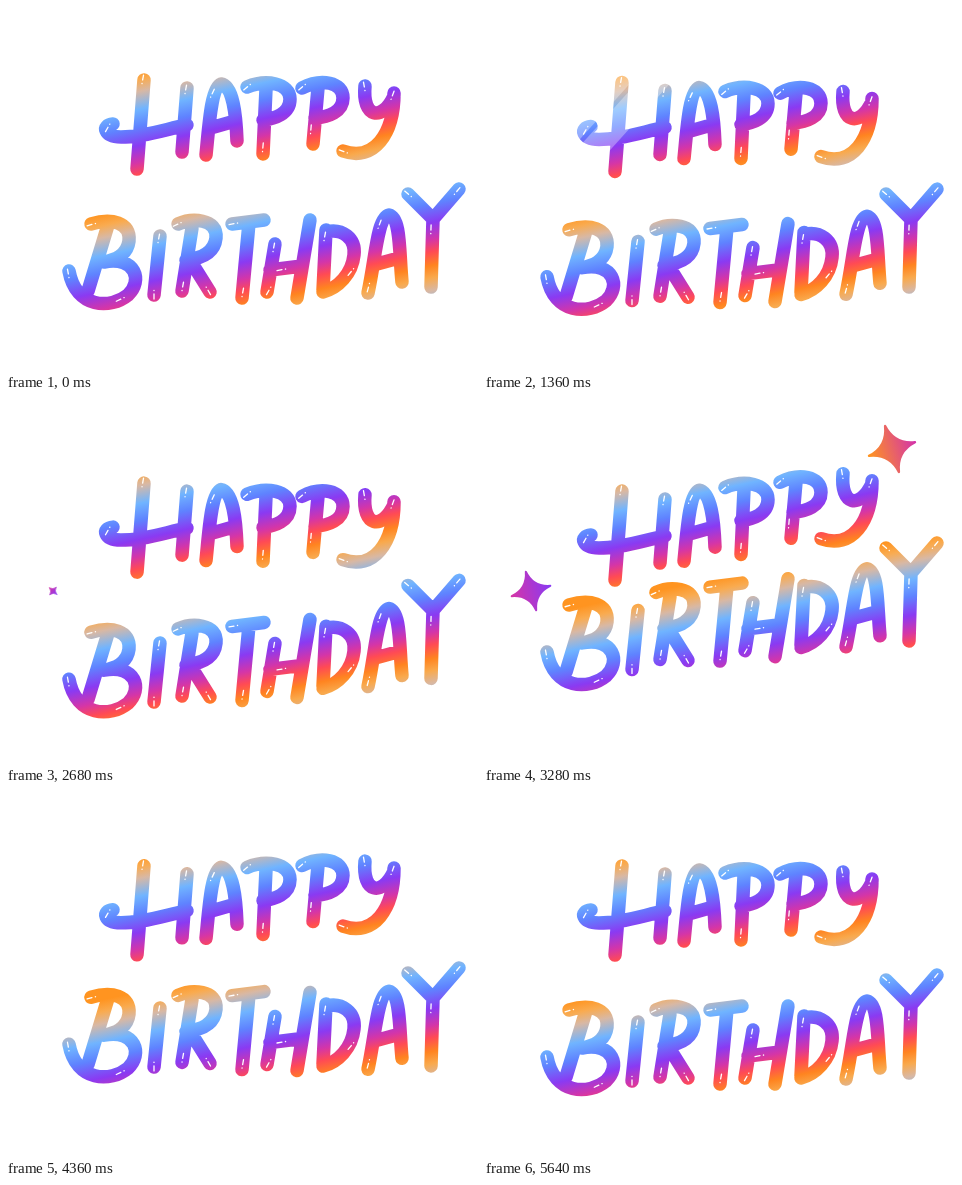
Write an HTML page with a canvas that moves like this. It is 472 px wide and 365 px high and loops after 5680 ms.

```html
<!DOCTYPE html>
<html lang="en">
<head>
<meta charset="utf-8">
<title>Happy Birthday</title>
<style>
  html, body { margin: 0; width: 100%; height: 100%; overflow: hidden; background: #fff; }
  canvas { display: block; }
</style>
</head>
<body>
<canvas id="stage" width="472" height="365" role="img" aria-label="Happy Birthday"></canvas>
<script>
const ctx = document.getElementById('stage').getContext('2d');
const LOOP = 5680, STEP = 40, WAVE = 1410, FALL = 560;
const TAU = Math.PI * 2, RAD = Math.PI / 180;

const ORANGE = '#ff9420', TAN = '#d8b8a4', SKY = '#70b4ff', BLUE = '#5f83ff',
      PURPLE = '#8a3af2', MAGENTA = '#d435a8', RED = '#ff4a55';

// Colour bands by vertical distance from the purple line
const BANDS = [[-78, ORANGE], [-66, '#f9ab50'], [-54, TAN], [-36, SKY], [-19, BLUE], [0, PURPLE],
               [17, MAGENTA], [29, RED], [43, '#ff8420'], [55, '#f9a94c'], [68, TAN], [84, SKY]];

// Each letter: its strokes, then highlight marks as [x, y, angle]
const words = [
  { x: 135, y: 139, slope: .215, drift: 6, letters: [
    ['M138 74L131 163M107 118C95 119 98 131 115 131C140 131 160 123 181 119M181 82L176 146',
      [[137, 72, 100], [180, 82, 100], [101, 123, 300]]],
    ['M200 149C203 120 205 82 215 78C227 80 230 108 231 135M208 121L229 115',
      [[207, 86, 115]]],
    ['M241 81C260 73 284 77 284 93C284 108 268 113 257 114M260 83L257 148',
      [[240, 82, 320], [257, 140, 95]]],
    ['M296 82C315 72 337 76 337 92C337 106 322 111 309 112M312 82L307 138',
      [[295, 82, 320], [305, 122, 95]]],
    ['M359 80C356 112 376 116 388 90M388 87C388 128 368 156 337 145',
      [[358, 79, 80], [387, 88, 110], [336, 145, 20]]]
  ] },
  { x: 100, y: 285, slope: .21, drift: 0, letters: [
    ['M85 218C105 212 125 216 123 235C121 250 108 254 98 256C130 250 137 275 122 289C105 303 70 303 63 265M102 219L82 285',
      [[84, 219, 345], [62, 266, 80], [113, 294, 335]]],
    ['M154 230L148 289', [[153, 231, 100], [148, 290, 270]]],
    ['M172 218C185 212 212 212 210 232C208 250 190 253 180 254M186 222L176 285M184 254L204 286',
      [[170, 219, 335], [177, 279, 100], [203, 286, 240]]],
    ['M226 218L258 214M243 217L236 292', [[226, 218, 350], [237, 285, 100]]],
    ['M269 238L261 286M304 214L291 292M264 264L296 260',
      [[268, 240, 100], [262, 286, 300], [274, 264, 350]]],
    ['M320 224L317 284M320 226C336 222 350 232 348 249C346 268 332 282 317 286',
      [[319, 229, 100], [344, 267, 310]]],
    ['M362 287C370 250 371 212 383 209C395 212 393 245 396 276M371 258L393 252',
      [[374, 217, 110], [362, 283, 285]]],
    ['M402 188L427 213L453 183M427 213L425 281', [[401, 187, 40], [452, 184, 130], [425, 222, 92]]]
  ] }
];
words.forEach(w => w.letters = w.letters.map(([d, marks]) => ({ path: new Path2D(d), marks })));

// Sparkles: centre, peak radius, start, end, left and right colours
const stars = [
  [47, 192, 16, 60, 580, MAGENTA, PURPLE],
  [403, 50, 20, 60, 640, ORANGE, RED],
  [70, 172, 18, 480, 1200, RED, PURPLE],
  [403, 57, 14, 1480, 2200, '#ff7a30', RED],
  [417, 102, 23, 1480, 2200, '#c436c4', BLUE],
  [47, 192, 20, 2640, 3600, MAGENTA, PURPLE],
  [408, 50, 24, 2800, 3500, ORANGE, MAGENTA],
  [421, 103, 20, 3280, 4000, PURPLE, '#6a60ff'],
  [408, 50, 25, 4400, 5120, ORANGE, MAGENTA]
];

// Ribbons: centre, radius, from and to angle, start, end, width, left and right colours
const ribbons = [
  [391, 58, 25, 180, 365, 480, 1200, 6.5, TAN, RED],
  [105, 97, 40, 200, 161, 480, 1200, 6.5, ORANGE, '#ffae48'],
  [270, 319, 32, 0, 90, 1480, 2200, 7, PURPLE, '#6f84ff'],
  [207, 331, 20, -42, 92, 3560, 4280, 6.5, ORANGE, '#f9a440'],
  [313, 308, 30, 105, 40, 4400, 5120, 7.5, BLUE, '#8dbdf4']
];

const ease = p => { p = Math.min(1, Math.max(0, p)); return p * p * (3 - 2 * p); };

// Vertical bob: quick lift, slower drop, one step later per letter
function bob(t, i) {
  const p = ((t - 905 - STEP * i) % WAVE + WAVE) % WAVE;
  return 20.5 * (p < FALL ? Math.cos(Math.PI * p / FALL)
                          : -Math.cos(Math.PI * (p - FALL) / (WAVE - FALL)));
}

function bandFill(w, t) {
  const first = BANDS[0][0], range = BANDS[BANDS.length - 1][0] - first;
  const y = w.y + first + w.drift * (1 - Math.cos(TAU * t / WAVE));
  const s = range / (1 + w.slope * w.slope);
  const g = ctx.createLinearGradient(w.x, y, w.x + w.slope * s, y + s);
  BANDS.forEach(([o, c]) => g.addColorStop((o - first) / range, c));
  return g;
}

function acrossFill(x, r, left, right) {
  const g = ctx.createLinearGradient(x - r, 0, x + r, 0);
  g.addColorStop(0, left);
  g.addColorStop(1, right);
  return g;
}

function drawWords(t) {
  let i = 0;
  const marks = [];
  for (const w of words) {
    const all = new Path2D();
    for (const l of w.letters) {
      const dy = bob(t, i) - bob(0, i);
      all.addPath(l.path, new DOMMatrix([1, 0, 0, 1, 0, dy]));
      l.marks.forEach(([x, y, a]) => marks.push([x, y + dy, a * RAD]));
      i++;
    }
    ctx.lineWidth = 13.5;
    ctx.strokeStyle = bandFill(w, t);
    ctx.stroke(all);
  }
  return marks;
}

function drawShine(t) {
  const p = (t - 1320) / 720;
  if (p <= 0 || p >= 1) return;
  ctx.save();
  ctx.globalCompositeOperation = 'source-atop';
  ctx.translate(-60 + 608 * p, 240);
  ctx.transform(1, 0, -.9, 1, 0, 0);
  ctx.fillStyle = 'rgba(255,255,255,.32)';
  ctx.fillRect(-54, -240, 80, 400);
  ctx.fillRect(32, -240, 34, 400);
  ctx.restore();
}

function drawMarks(marks) {
  ctx.strokeStyle = '#fff';
  ctx.lineWidth = 1.3;
  ctx.beginPath();
  for (const [x, y, a] of marks) {
    const c = Math.cos(a), s = Math.sin(a);
    ctx.moveTo(x - 3 * c, y - 3 * s);
    ctx.lineTo(x + 2 * c, y + 2 * s);
    ctx.moveTo(x + 5.5 * c, y + 5.5 * s);
    ctx.lineTo(x + 5.7 * c, y + 5.7 * s);
  }
  ctx.stroke();
}

function drawStar([x, y, peak, from, to, left, right], t) {
  const p = (t - from) / (to - from);
  if (p <= 0 || p >= 1) return;
  const r = peak * ease(Math.min(p, 1 - p) * 8);
  ctx.save();
  ctx.translate(x, y);
  ctx.rotate((.5 - p) * TAU / 4);
  ctx.beginPath();
  for (let k = 0; k <= 4; k++) {
    const a = k * TAU / 4, m = a - TAU / 8;
    const px = r * Math.cos(a), py = r * Math.sin(a);
    if (k) ctx.quadraticCurveTo(r * .22 * Math.cos(m), r * .22 * Math.sin(m), px, py);
    else ctx.moveTo(px, py);
  }
  ctx.closePath();
  ctx.fillStyle = ctx.strokeStyle = acrossFill(0, r, left, right);
  ctx.lineWidth = r * .1;
  ctx.fill();
  ctx.stroke();
  ctx.restore();
}

function drawRibbon([x, y, r, a, b, from, to, width, left, right], t) {
  const p = (t - from) / (to - from);
  if (p <= 0 || p >= 1) return;
  const tail = a + (b - a) * ease(p * 2 - 1), head = a + (b - a) * ease(p * 2);
  ctx.save();
  ctx.lineCap = 'butt';
  ctx.lineWidth = width;
  ctx.strokeStyle = acrossFill(x, r, left, right);
  ctx.beginPath();
  ctx.arc(x, y, r, tail * RAD, head * RAD, b < a);
  ctx.stroke();
  ctx.restore();
}

function frame() {
  const t = Math.floor(performance.now() % LOOP / STEP) * STEP;
  ctx.clearRect(0, 0, 472, 365);
  ctx.lineCap = ctx.lineJoin = 'round';
  const marks = drawWords(t);
  drawShine(t);
  drawMarks(marks);
  ribbons.forEach(r => drawRibbon(r, t));
  stars.forEach(s => drawStar(s, t));
  requestAnimationFrame(frame);
}
frame();
</script>
</body>
</html>
```
